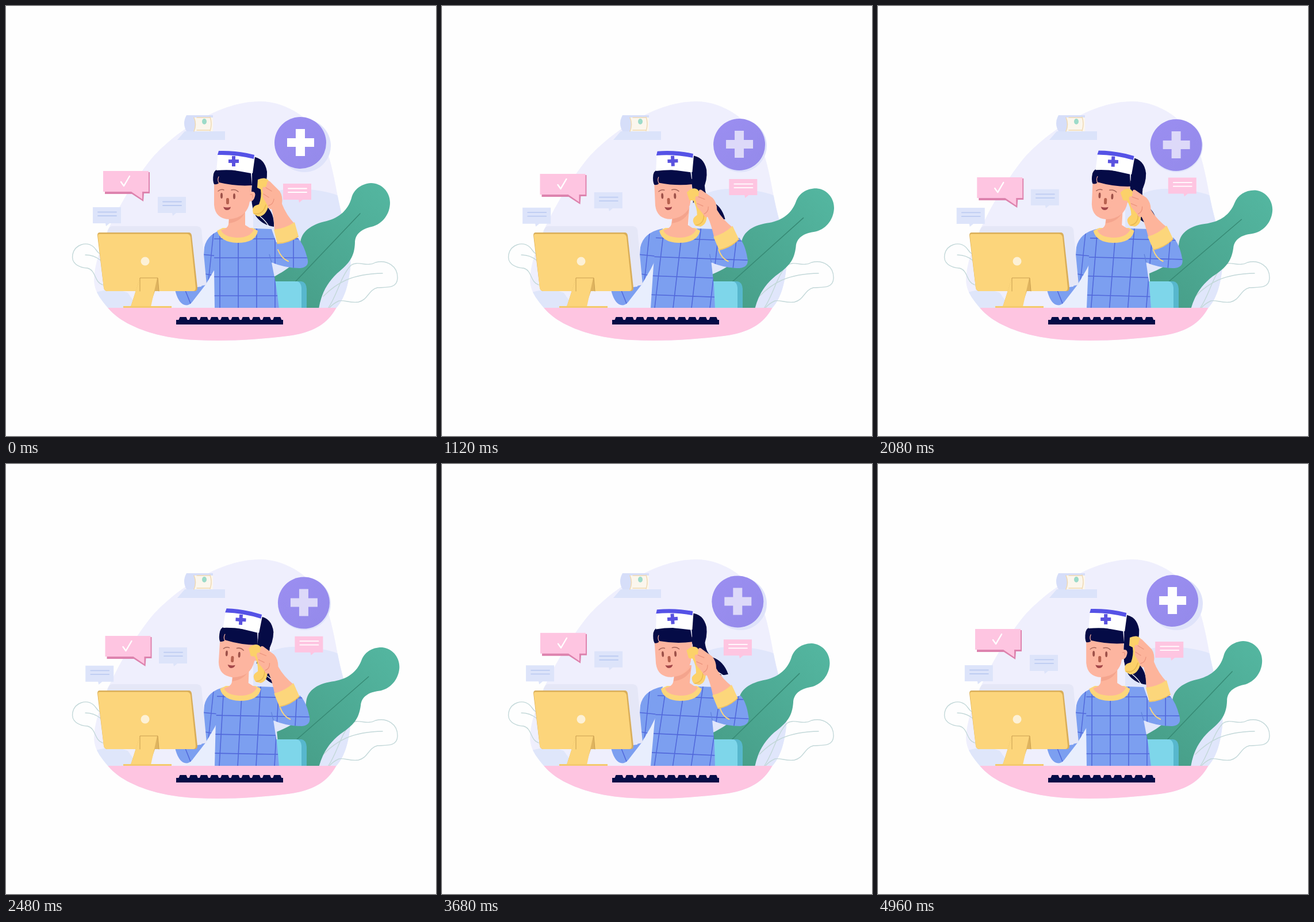
Animation, 748 px wide and 748 px high, one loop 5.04 s. Source, as an HTML page:

```html
<!DOCTYPE html>
<html lang="en">
<head>
<meta charset="utf-8">
<title>Nurse on call</title>
<style>
html, body { margin: 0; width: 100%; height: 100%; overflow: hidden; background: #fefefe; }
svg { display: block; width: 100vw; height: 100vh; }
.line { fill: none; stroke-linecap: round; stroke-linejoin: round; }
</style>
</head>
<body>
<svg viewBox="0 0 748 748">
  <defs>
    <linearGradient id="leafFill" x1="1" y1="0" x2="0.2" y2="1">
      <stop offset="0" stop-color="#54b7a1"/><stop offset="1" stop-color="#479e88"/>
    </linearGradient>
    <linearGradient id="badgeFill" x1="0" y1="0" x2="1" y2="1">
      <stop offset="0" stop-color="#9b8ef1"/><stop offset="1" stop-color="#948aea"/>
    </linearGradient>
    <path id="torsoShape" d="M376 387Q404 396 432 387L462 388L470 411L507 403Q518 414 524 438Q529 454 512 456Q485 456 462 446L470 487L475 526H363L362 458V400Z"/>
    <path id="sleeveShape" d="M384 387Q350 394 345 420L340 488L294 494Q299 514 308 519Q316 523 323 516L347 485L363 458L372 440Z"/>
    <clipPath id="torsoClip"><use href="#torsoShape"/></clipPath>
    <clipPath id="sleeveClip"><use href="#sleeveShape"/></clipPath>
    <clipPath id="blobClip"><path d="M440 166C480 165 522 188 546 225C566 258 572 310 581 350C590 388 602 420 599 456C595 490 588 510 574 526C560 551 537 568 490 574C440 580 385 584 330 581C265 578 205 558 178 526C160 505 150 490 154 465C162 405 212 315 256 262C300 215 372 167 440 166Z"/></clipPath>
    <clipPath id="aboveDesk"><rect width="748" height="525"/></clipPath>
  </defs>

  <g clip-path="url(#blobClip)">
    <rect width="748" height="748" fill="#efeffd"/>
    <path d="M430 345Q462 318 500 318Q545 318 576 329L610 372V525H430Z" fill="#e0e6fb"/>
    <path d="M150 500Q185 488 212 499L230 525H150Z" fill="#dfe6fa"/>
  </g>

  <g id="shelf">
    <path d="M311 218H381V233H298Z" fill="#dbe3fa"/>
    <path d="M314 190H360V218H314Q306 204 314 190Z" fill="#d6def9"/>
    <path d="M327 194H360V218H327Q332 206 327 194Z" fill="#fbf6ed"/>
    <path class="line" d="M327 194Q332 206 327 218M355 193Q359 205 355 217M332 194H354M332 216H354" stroke="#efd9b4" stroke-width="1.5"/>
    <ellipse cx="345" cy="201" rx="4" ry="5" fill="#9ddbc9"/>
  </g>

  <g clip-path="url(#aboveDesk)">
    <path class="line" d="M560 526C575 506 582 470 600 451C612 442 628 455 643 446C662 441 682 452 681 474C680 492 661 489 646 490C630 494 630 511 613 515C598 517 588 511 579 513Q568 518 562 526" stroke="#c3d8d9" stroke-width="1.4"/>
    <path class="line" d="M552 505C575 482 600 466 655 465" stroke="#c3d8d9" stroke-width="1.5"/>
    <path class="line" d="M168 485C153 480 157 460 142 456C125 455 113 447 116 432C120 414 140 410 151 418C159 424 157 430 169 433M138 433Q153 433 164 442" stroke="#c3d8d9" stroke-width="1.4"/>
  </g>

  <circle cx="519" cy="243" r="46" fill="#dfe3fa"/>
  <g id="badge">
    <circle cx="512" cy="238" r="45" fill="url(#badgeFill)"/>
    <path id="badgeCross" d="M504 214H520V230H536V245H520V261H504V245H489V230H504Z" fill="#fff"/>
  </g>

  <g id="bubbles"></g>

  <g clip-path="url(#aboveDesk)">
    <g id="leaf">
      <path d="M543 535C546 506 556 484 576 465C598 447 606 436 607 412C607 397 618 388 636 384C656 379 668 361 668 342C668 323 653 308 635 308C618 309 605 319 601 334C595 355 580 368 558 374C530 380 513 393 512 413C512 440 500 453 466 471L478 535Z" fill="url(#leafFill)"/>
      <path class="line" d="M500 483L616 361" stroke="#378a75" stroke-width="1.5"/>
    </g>
    <path d="M490 479H514Q522 480 523 492V525H490Z" fill="#57b7cd"/>
    <path d="M462 479H506Q513 480 514 490V525H462Z" fill="#7ed6ea"/>

    <g id="hairBack">
      <path d="M428 262Q450 264 454 288Q455 306 446 322L428 345Z" fill="#050b46"/>
      <g id="ponytail">
        <path d="M430 300Q447 300 449 318Q444 336 452 347Q467 360 466 384Q446 381 435 366Q424 347 428 310Z" fill="#050b46"/>
        <path class="line" d="M442 366Q452 374 457 383" stroke="#fff" stroke-width="1.4"/>
      </g>
    </g>

    <path d="M372 440L366 526H312Z" fill="#e8eefd"/>
    <use href="#sleeveShape" fill="#7c9ff0"/>
    <path class="line" clip-path="url(#sleeveClip)" d="M362 385L352 480M340 432L380 436M340 465L380 472M310 490L322 520" stroke="#5168db" stroke-width="1.5"/>

    <g id="body">
      <use href="#torsoShape" fill="#7c9ff0"/>
      <g clip-path="url(#torsoClip)"><path id="grid" class="line" stroke="#5168db" stroke-width="1.6"/></g>
      <path class="line" d="M473 424Q479 439 491 444" stroke="#fbd67b" stroke-width="2"/>
      <path class="line" d="M462 446L458 432" stroke="#5f80dc" stroke-width="1.2"/>
      <path d="M367 391L377 386H429L438 391Q435 412 402 412Q373 411 367 391Z" fill="#fcd67b"/>
      <path d="M389 350H416V381Q423 386 431 389Q425 403 402 403Q379 402 374 390Q386 387 387 380Z" fill="#fdb49b"/>
      <path d="M388 370Q405 368 415 353V360Q408 375 388 378Z" fill="#f4a48d"/>
    </g>

    <g id="head">
      <path d="M362 300H427V323Q435 322 433 331Q431 340 424 340Q420 368 388 371Q364 370 362 346Z" fill="#fdb5a0"/>
      <path d="M426 291L428 312Q400 314 371 307Q368 311 362 310Q359 304 361 292Q364 282 376 282Z" fill="#050b46"/>
      <path class="line" d="M371 309Q367 303 370 297" stroke="#fdb5a0" stroke-width="1.2"/>
      <path d="M369 254Q402 254 433 262L429 291Q398 283 366 286Z" fill="#fff"/>
      <path d="M370 252Q402 251 432 259L431 266Q400 258 368 259Z" fill="#5552e6"/>
      <path d="M393 261H399V267H405V273H399V279H393V273H387V267H393Z" fill="#5a52df"/>
      <g fill="#9d5149">
        <ellipse cx="375" cy="330" rx="2" ry="5"/><ellipse cx="397" cy="331" rx="2" ry="5"/>
        <rect x="383" y="334" width="5" height="11" rx="2.3" fill="#b7614f"/>
        <path d="M378 349.5Q385 351.5 391 349.5Q390 355 384 355Q380 355 378 349.5Z" fill="#a3474a"/>
      </g>
      <path class="line" d="M369 322Q374 318 379 320M392 320Q399 318 404 323" stroke="#a9665a" stroke-width="1.5"/>
      <path class="line" d="M425 328Q430 326 429 333" stroke="#e89480" stroke-width="1.2"/>
    </g>

    <g id="arm">
      <g id="phone">
        <path d="M438 302Q451 296 457 304Q464 322 457 346Q452 367 438 366L430 361Q427 350 434 347L440 345Q445 332 443 319L437 316Z" fill="#fcd169"/>
        <path class="line" d="M432 361Q447 364 452 346" stroke="#e9b850" stroke-width="1.5"/>
      </g>
      <path d="M446 319Q446 313 452 315L455 305Q458 303 461 307L476 322Q482 331 480 344Q487 363 503 380L467 391Q466 367 462 353Q457 355 455 347L450 338Q445 332 447 326Z" fill="#fdb49b"/>
      <path class="line" d="M448 327L457 333M452 316L462 322M457 347Q465 345 466 336" stroke="#ec957e" stroke-width="1.3"/>
      <path d="M466 389Q486 387 502 376L509 401Q493 413 472 414Z" fill="#fcd67b"/>
      <path class="line" d="M472 413Q493 412 508 401" stroke="#edc160" stroke-width="1.4"/>
    </g>

    <path d="M184 383H331Q338 383 340 389L349 485L334 488L176 394Q178 384 184 383Z" fill="#e5e7f7"/>
    <path d="M163 394H318Q322 394 323 399L333 490Q333 496 328 496H177Q171 496 170 490L159 399Q159 394 163 394Z" fill="#d9ae5a"/>
    <path d="M163 396.5H315Q320 397 321 402L330 490Q330 496 325 496H177Q171 496 170 490L160 401Q159 397 163 396.5Z" fill="#fcd57b"/>
    <circle cx="242" cy="444" r="7.5" fill="#fdf1d6"/>
    <path d="M233 473H264L266 496H259L250 523H217Z" fill="#dfb45f"/>
    <path d="M233 473H263L252 523H217Z" fill="#fcd57b"/>
    <path class="line" d="M233 496V473H264L266 496" stroke="#c99f50" stroke-width="1"/>
    <path d="M204 522H288V525H204Z" fill="#f4ca6c"/>
  </g>

  <g clip-path="url(#blobClip)"><rect y="525" width="748" height="80" fill="#fec5e1"/></g>
  <path id="keyboard" fill="#050b46"/>
</svg>
<script>
const LOOP = 5040, STEP = 80;
const $ = id => document.getElementById(id);

const times = [0, 640, 1160, 1680, 2480, 3080, 3680, 4240, 4960];
const tracks = {
  sway:  [0, .33, .75, .98, .85, .6, .33, .12, .01],
  lean:  [0, 6, 10.5, 10, 5, 9, 13, 7, .2],
  headX: [0, 5, 9.5, 11.5, 7.5, 8, 10.5, 5.5, .2],
  tilt:  [0, -3.5, -2.5, .3, 3.5, 0, -3.8, -1.4, 0],
  armX:  [0, 5, 7, 7, 1, 3, 5, 2, 0],
  armY:  [0, 7, 9, 10, 7, 8.5, 10, 6, 0],
  bend:  [0, -6, -10, -12, -8.5, -9, -9, -5, 0]
};

// Periodic cubic curve through the keys of a track.
function sample(keys, t) {
  const n = times.length;
  const at = i => times[(i + n) % n] + Math.floor(i / n) * LOOP;
  const val = i => keys[(i + n) % n];
  const slope = i => (val(i + 1) - val(i - 1)) / (at(i + 1) - at(i - 1));
  let i = n - 1;
  while (times[i] > t) i--;
  const d = at(i + 1) - at(i), u = (t - at(i)) / d, v = 1 - u;
  return val(i) * v * v * (1 + 2 * u) + val(i + 1) * u * u * (3 - 2 * u)
    + d * u * v * (slope(i) * v - slope(i + 1) * u);
}

const move = (id, ...parts) => $(id).setAttribute("transform", parts.join(" "));
const shift = (x, y) => `translate(${x} ${y})`;
const turn = (a, x, y) => `rotate(${a} ${x} ${y})`;

const note = (id, fill, ink, tail) => `<g id="${id}">
  <path d="M0 0H49V28H${tail + 7}L${tail + 1} 33L${tail} 28H0Z" fill="${fill}"/>
  <path class="line" d="M9 8.5H41M9 15H41" stroke="${ink}" stroke-width="1.8"/></g>`;

$("bubbles").innerHTML =
  note("noteLeft", "#dde4fa", "#bdccf2", 22) +
  note("noteMid", "#dde4fa", "#bdccf2", 25) +
  note("notePink", "#fec5e1", "#fff", 27) +
  `<g id="check">
    <path d="M3 2H81V39H71L70 53L50 40H3Z" fill="#dd83ae"/>
    <path d="M0 0H79V36H68V49L49 36H0Z" fill="#fec5e1"/>
    <path class="line" d="M31 19L36 26L46 9" stroke="#fff" stroke-width="2.4"/>
  </g>`;

let lines = "";
for (let i = -1; i < 6; i++) lines += `M${404 + 32 * i} 370V540`;
for (let i = 0; i < 4; i++) lines += `M330 ${405 + 33 * i}H550`;
$("grid").setAttribute("d", lines);

let keys = "M296 546H482V554H296Z";
for (let i = 0; i < 10; i++) keys += `M${300 + 18.2 * i} 547l2.5-6h11l2.5 6Z`;
$("keyboard").setAttribute("d", keys);

function draw(t) {
  const k = {};
  for (const name in tracks) k[name] = sample(tracks[name], t);
  const bob = (1 - Math.cos(2 * Math.PI * t / LOOP)) / 2;

  move("leaf", turn(6.2 * k.sway, 525, 525));
  move("badge", shift(7 * k.sway, 4.2 * k.sway));
  $("badgeCross").setAttribute("opacity", 1 - .33 * Math.min(1, 3.2 * k.sway));
  move("noteLeft", shift(151 - 15 * k.sway, 350 + k.sway));
  move("notePink", shift(482 + 24 * k.sway, 309 - 11 * k.sway));
  move("noteMid", shift(264 + 2 * bob, 332 - 7 * (bob + k.sway)));
  move("check", shift(169 + 3.5 * bob, 287 + 12 * bob));

  const lean = k.lean / 126;
  move("body", `matrix(1 0 ${-lean} 1 ${525 * lean} 0)`);
  move("grid", turn(.2 * k.lean, 410, 470));
  const head = [shift(k.headX, 0), turn(k.tilt, 385, 352)];
  move("head", ...head);
  move("hairBack", ...head);
  move("ponytail", turn(-1.4 * k.lean, 440, 315));
  move("arm", shift(k.armX, k.armY), turn(k.bend, 487, 395));
  move("phone", turn(1.25 * k.bend, 450, 325));
}

function frame(now) {
  draw(Math.floor(now % LOOP / STEP) * STEP);
  requestAnimationFrame(frame);
}
draw(0);
requestAnimationFrame(frame);
</script>
</body>
</html>
```
